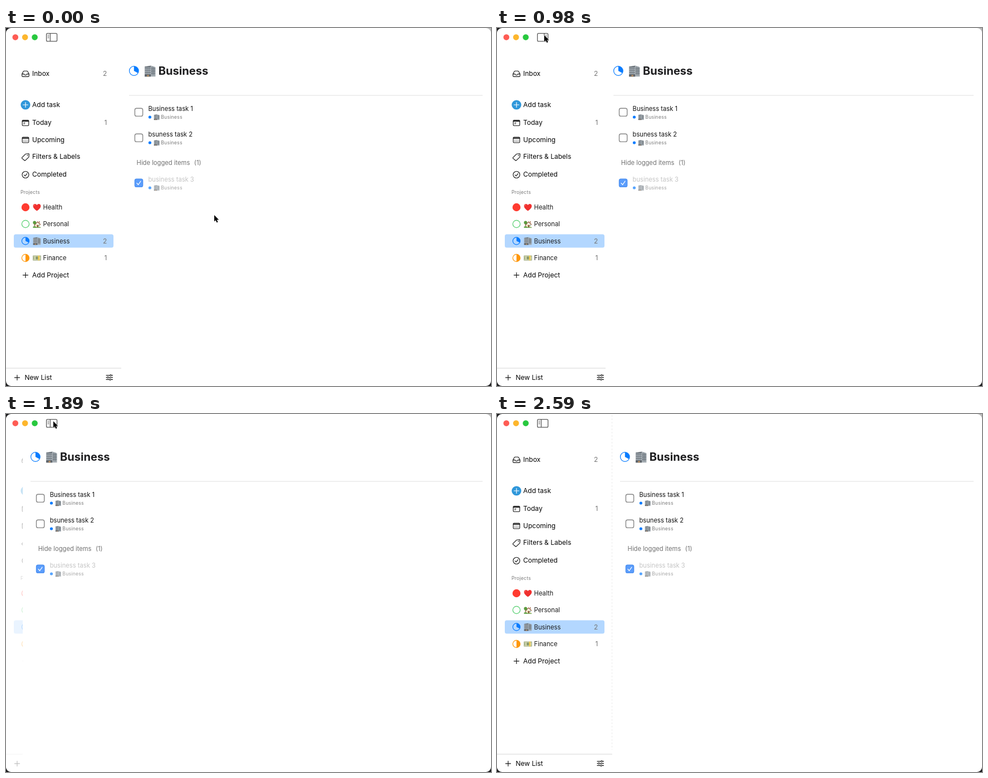
Recreate the animation shown at these times as an HTML page. Size 871x643 px, loop 3010 ms.

```html
<!DOCTYPE html>
<html lang="en">
<head>
<meta charset="utf-8">
<title>Task list with a collapsing sidebar</title>
<style>
  html, body { margin: 0; width: 100%; height: 100%; overflow: hidden; background: #222; }
  svg { display: block; }
  text { font-family: Inter, "Liberation Sans", sans-serif; white-space: pre; }
  .nav { font-size: 12px; fill: #050505; }
  .item { font-size: 11.3px; fill: #1c1c1c; }
  .count { font-size: 12px; fill: #757575; text-anchor: end; }
  .task { font-size: 11.2px; fill: #141414; }
  .log { font-size: 11.2px; fill: #727272; }
  .tiny { font-size: 8.7px; letter-spacing: .2px; fill: #7c7c7c; }
  .title { font-size: 20.1px; font-weight: 700; fill: #1d1d1f; }
  .icon { fill: none; stroke: #161616; stroke-width: 1.15; stroke-linecap: round; stroke-linejoin: round; }
  .toggle { fill: none; stroke: #5b5b5b; stroke-width: 1.3; }
</style>
</head>
<body>
<svg width="871" height="643" viewBox="0 0 871 643">
  <defs>
    <clipPath id="edge"><rect id="edgeBox" width="207" height="643"/></clipPath>
    <symbol id="office" viewBox="0 0 16 16">
      <path d="M.8 2l8.2-1.2V15.4H.8z" fill="#757c83"/>
      <path d="M9 .8l6.2 2V15.4H9z" fill="#a3abb1"/>
      <path d="M1 4h8M1 6.4h8M1 8.8h8M1 11.2h8" stroke="#c3ccd3" stroke-width="1.1"/>
      <path d="M9 4.2l6 .6M9 6.6l6 .4M9 9h6M9 11.4h6" stroke="#6d767e" stroke-width=".9"/>
      <path d="M3 2v11M5 1.6v11.4M7 1.4v11.6M11 2v11M13 2.4v11" stroke="#68727a" stroke-width=".5"/>
      <path d="M.8 13H9v2.4H.8z" fill="#5c636a"/>
      <path d="M4 13.2h2.4v2.2H4z" fill="#b78d62"/>
    </symbol>
    <symbol id="heart" viewBox="0 0 16 16">
      <path d="M8 15C5.2 12.9.6 9.7.6 5.6.6 3.2 2.3 1.6 4.3 1.6 6 1.6 7.3 2.5 8 4c.7-1.5 2-2.4 3.7-2.4 2 0 3.7 1.6 3.7 4C15.4 9.7 10.8 12.9 8 15z" fill="#f0302f"/>
      <path d="M2.3 5.2Q2.6 3.3 4.3 3.1" fill="none" stroke="#ff7a70" stroke-linecap="round"/>
    </symbol>
    <symbol id="house" viewBox="0 0 16 16">
      <path d="M5 8.5h9V14H5z" fill="#ecdcb9"/>
      <path d="M3.4 9L9.2 2.8 15.6 9l-1 .9-5.4-5-4.8 5z" fill="#99593a"/>
      <path d="M11.8 2.6h1.5v3.6l-1.5-1.5z" fill="#a36848"/>
      <path d="M8.3 10h2.5v4H8.3z" fill="#7b492d"/>
      <path d="M11.6 9.5h1.6v2h-1.6z" fill="#63a9d0"/>
      <path d="M2.7 7H4v7H2.7z" fill="#76512f"/>
      <circle cx="3.5" cy="5.2" r="3.1" fill="#5b9a3e"/>
      <path d="M.5 13q3.5-2 7 1h7.8v1.4H.5z" fill="#6aa84f"/>
    </symbol>
    <symbol id="cash" viewBox="0 0 16 16">
      <path d="M.3 3.5h15.4v9.2H.3z" fill="#8f9b6d"/>
      <path d="M1.2 4.4h13.6v7.4H1.2z" fill="#d5dcb3"/>
      <circle cx="8" cy="8.1" r="2.7" fill="#87966a"/>
      <path d="M10.3 3.5H13v9.2h-2.7z" fill="#f2c94a"/>
      <path d="M2.3 6v4.2" stroke="#87966a" stroke-width="1.2"/>
    </symbol>
  </defs>

  <rect width="871" height="643" fill="#1d1d1f"/>
  <rect x="850" width="21" height="30" fill="#b9b9b9"/>
  <rect width="871" height="643" rx="9" fill="#fff"/>

  <g id="sidebar" clip-path="url(#edge)"></g>
  <line id="divider" x1="206.5" x2="206.5" y1="2" y2="603" stroke="#ebebeb" stroke-dasharray="3 3"/>
  <line id="rule" x2="856" y1="121" y2="121" stroke="#e0e0e0" stroke-width="1.2"/>
  <g id="content"></g>

  <circle cx="16.8" cy="16.6" r="5.3" fill="#fe5c54"/>
  <circle cx="34.2" cy="16.6" r="5.3" fill="#fdb62d"/>
  <circle cx="51.6" cy="16.6" r="5.3" fill="#28c83f"/>
  <rect class="toggle" x="72.6" y="9.7" width="19" height="14.2" rx="2"/>
  <g id="leftPane" class="toggle"><path d="M79.4 9.7v14.2"/><path d="M74.8 12.9h2.5M74.8 15.3h2.5M74.8 17.7h2.5" stroke-width="1"/></g>
  <g id="rightPane" class="toggle"><path d="M84.8 9.7v14.2"/><path d="M87 12.9h2.5M87 15.3h2.5M87 17.7h2.5" stroke-width="1"/></g>

  <path id="cursor" d="M0 0V11.6L2.7 9.2 4.5 13.4 6.5 12.5 4.7 8.4H8.3Z" fill="#000" stroke="#fff" paint-order="stroke"/>
</svg>

<script>
const $ = id => document.getElementById(id);
const BLUE = '#087cff';

const text = (cls, x, y, s) => `<text class="${cls}" x="${x}" y="${y}">${s}</text>`;
const icon = (d, extra = '') => `<path class="icon" d="${d}" ${extra}/>`;
const emoji = (id, x, y, size) => `<use href="#${id}" x="${x}" y="${y}" width="${size}" height="${size}"/>`;
const pie = (x, y, r, color, part) => `<g fill="none" stroke="${color}">
  <circle cx="${x}" cy="${y}" r="${r}" stroke-width="1.2"/>
  <circle class="wedge" data-part="${part}" cx="${x}" cy="${y}" r="${r / 2}" stroke-width="${r}"
    pathLength="100" stroke-dasharray="${part} 200" ${part ? '' : 'visibility="hidden"'} transform="rotate(-90 ${x} ${y})"/></g>`;

function sidebar() {
  const nav = [['Inbox', 82, 2], ['Add task', 138], ['Today', 170, 1], ['Upcoming', 200.5],
    ['Filters &amp; Labels', 231], ['Completed', 263], ['Add Project', 444]];
  const projects = [['Health', 322, '#ff3b30', 100, 'heart'], ['Personal', 352, '#53cf6e', 0, 'house'],
    ['Business', 382.5, BLUE, 33, 'office', 2], ['Finance', 413, '#ff9809', 50, 'cash', 1]];
  const calendar = y => icon(`M30.6 ${y - 5}h8.8q1.4 0 1.4 1.4v7.2q0 1.4-1.4 1.4h-8.8q-1.4 0-1.4-1.4v-7.2q0-1.4 1.4-1.4z`)
    + icon(`M29.7 ${y - 3.3}h10.6`, 'style="stroke-width:2"');
  const count = (n, y) => n ? text('count', 181.3, y + 4.4, n) : '';

  return '<rect x="14" y="370.5" width="179" height="24" rx="3.5" fill="#b3d7ff"/>'
    + nav.map(([s, y, n]) => text('nav', 47, y + 4.4, s) + count(n, y)).join('')
    + text('tiny', 26, 297.5, 'Projects')
    + projects.map(([s, y, color, part, pic, n]) => pie(35, y, 6.6, color, part)
      + emoji(pic, 48, y - 7.5, 15) + text('item', 66.5, y + 4.1, s) + count(n, y)).join('')
    + icon('M28.7 82.6L31.2 78q.4-.8 1.3-.8h5q.9 0 1.3.8l2.5 4.6v3.2q0 1.6-1.6 1.6h-9.4q-1.6 0-1.6-1.6zh3.8q.4 2 2.5 2t2.5-2h3.8')
    + '<circle cx="35" cy="138" r="8.6" fill="#2f97da"/>'
    + icon('M35 133.5v9M30.5 138h9', 'style="stroke:#fff"')
    + calendar(170.5) + icon('M32 170.5h2M32 172.5h1')
    + calendar(201) + icon('M32 201h6M32 203.6h6', 'stroke-dasharray=".3 2.6"')
    + icon('M28.8 232.7L34.8 226.6q.6-.6 1.4-.6l4.4-.2q.8 0 .8.8l-.3 4.4q0 .7-.6 1.3l-5.9 5.5q-.8.7-1.5 0l-4.3-3.7q-.7-.7 0-1.4z')
    + '<circle cx="38.5" cy="228.7" r=".9" fill="#222"/>'
    + '<circle class="icon" cx="35" cy="263.5" r="6"/>' + icon('M32.4 263.9l1.9 1.9 3.4-4.2')
    + icon('M35 439.2v9.2M30.4 443.8h9.2')
    + '<path d="M0 611h207" stroke="#d6d6d6"/>'
    + icon('M20 623.2v9.2M15.4 627.8h9.2') + text('nav', 33.5, 632, 'New List')
    + icon('M180 623.8h11.5M180 627.6h11.5M180 631.4h11.5')
    + [[188, 623.8], [183, 627.6], [187, 631.4]].map(([x, y]) =>
      `<circle cx="${x}" cy="${y}" r="1.4" fill="#fff" stroke="#161616"/>`).join('');
}

function task(y, s, done) {
  const box = done ? 'fill="#3385fb" stroke="#2276ee"' : 'fill="#fff" stroke="#868686"';
  return `<g ${done ? 'opacity=".8"' : ''}>
    <rect x="10.4" y="${y - 6.8}" width="14.2" height="14.2" rx="3" ${box} stroke-width="1.4"/>
    ${done ? icon(`M14 ${y + .6}l2.5 2.9 4.3-6.2`, 'style="stroke:#fff;stroke-width:1.3"') : ''}</g>
    <g ${done ? 'opacity=".68"' : ''}>
    <g ${done ? 'opacity=".36"' : ''}>${text('task', 34.5, y - 2.5, s)}</g>
    <circle cx="37.4" cy="${y + 9}" r="2.6" fill="${BLUE}"/>
    ${emoji('office', 44.2, y + 3.6, 11)}${text('tiny', 57.2, y + 12.1, 'Business')}</g>`;
}

$('sidebar').innerHTML = sidebar();
$('content').innerHTML = pie(8.8, 77, 8.3, BLUE, 33) + emoji('office', 27, 66.5, 21.5)
  + text('title', 52.8, 84.3, 'Business')
  + task(151, 'Business task 1') + task(197, 'bsuness task 2')
  + text('log', 13.6, 246, 'Hide logged items') + text('log', 116.8, 246, '(1)')
  + task(278, 'business task 3', true);

const wedges = [...$('sidebar').querySelectorAll('.wedge')];
const LOOP = 3010, STEP = 70, WIDTH = 207, SLIDE = 249;
const clamp = v => Math.min(1, Math.max(0, v));
const mix = (a, b, k) => a + (b - a) * k;

// cubic-bezier(.42, 0, .58, 1), solved by bisection
function ease(x) {
  x = clamp(x);
  let lo = 0, hi = 1;
  for (let i = 0; i < 24; i++) {
    const u = (lo + hi) / 2, v = 1 - u;
    if (3 * v * v * u * .42 + 3 * v * u * u * .58 + u * u * u < x) lo = u; else hi = u;
  }
  return lo * lo * (3 - 2 * lo);
}
const during = (t, start, length) => ease((t - start) / length);

function pointer(t) {
  if (t < 2100) {
    const k = during(t, 0, 630);
    return [mix(374, 85, k), mix(336, 13, k)];
  }
  const k = during(t, 2065, 315);
  return [mix(85, 324, k), mix(13, 598, k) + clamp((t - 2380) / 140) * 14];
}

function draw(t) {
  const open = 1 - during(t, 938, SLIDE) + during(t, 1824, SLIDE);
  const left = 14 + WIDTH * open;
  $('edgeBox').setAttribute('width', WIDTH * open);
  $('sidebar').setAttribute('opacity', open * (2 - open));
  $('content').setAttribute('transform', `translate(${left} 0)`);
  $('rule').setAttribute('x1', left);
  $('divider').setAttribute('visibility', t >= 2240 ? 'visible' : 'hidden');

  const filled = t < 1400 ? 1 : during(t, 1824, 412);
  for (const w of wedges) w.setAttribute('stroke-dasharray', `${w.dataset.part * filled} 200`);

  const swapped = clamp((t - 770) / 140) - clamp((t - 1610) / 140);
  $('leftPane').setAttribute('opacity', 1 - swapped);
  $('rightPane').setAttribute('opacity', swapped);

  $('cursor').setAttribute('transform', `translate(${pointer(t)})`);
  $('cursor').setAttribute('visibility', t < 2590 ? 'visible' : 'hidden');
}

const began = performance.now();
function tick() {
  const t = (performance.now() - began) % LOOP;
  draw(Math.floor(t / STEP) * STEP);
  requestAnimationFrame(tick);
}
tick();
</script>
</body>
</html>
```
